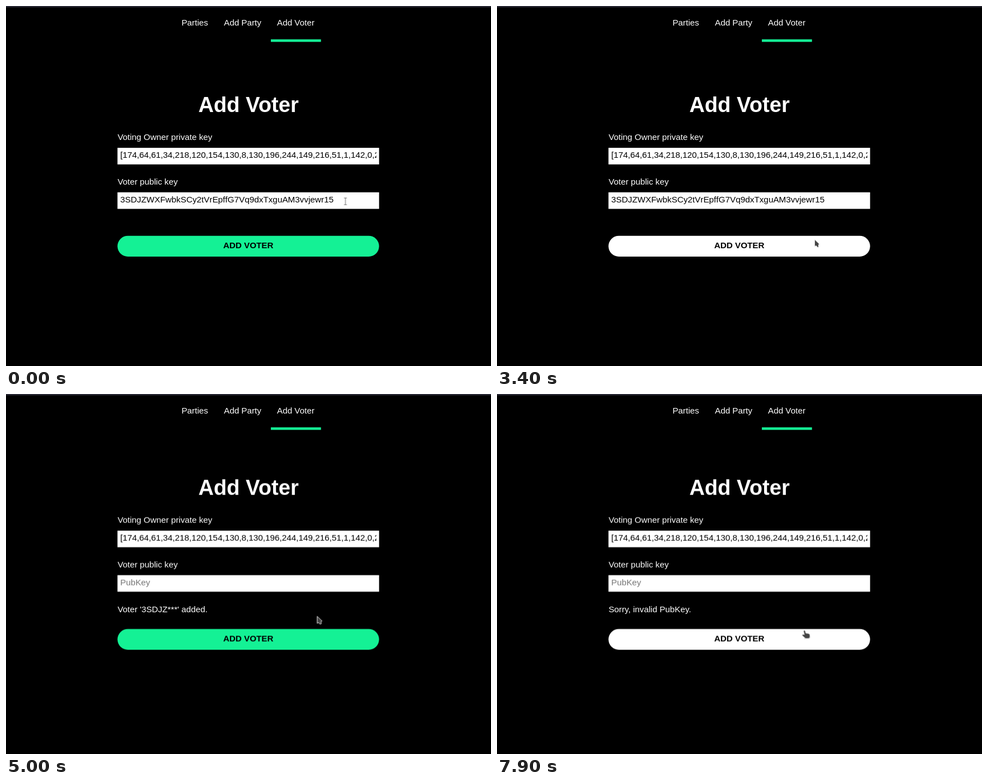
An HTML page for the animation above (8 s loop, 868 by 645 pixels).

```html
<!DOCTYPE html>
<html lang="en">
<head>
<meta charset="utf-8">
<title>Add Voter</title>
<style>
  html, body { margin: 0; width: 100%; height: 100%; overflow: hidden; background: #000; }
  svg { display: block; width: 868px; height: 645px; }
  text { font: 15.25px "Liberation Sans", Arial, sans-serif; fill: #fff; white-space: pre; }
  .title { font-size: 38.2px; font-weight: bold; text-anchor: middle; }
  .value { font-size: 15.3px; font-kerning: none; fill: #000; }
  .hint { fill: #757575; }
  .action { font-weight: bold; text-anchor: middle; fill: #000; }
  .field { fill: #fff; }
  .accent { fill: #14f195; }

  /* One shared 8 s clock; everything switches hard unless a keyframe says otherwise. */
  .form, .submit, .pill, .caret, .key, .hint, .busy, .done, .error, .cursor, .beam, .arrow, .hand {
    animation: 8s step-end infinite;
  }
  .form   { animation-name: form; }
  .submit { animation-name: submit; }
  .pill   { animation-name: pill; }
  .caret  { animation-name: caret; }
  .key    { animation-name: key; }
  .hint   { animation-name: hint; }
  .busy   { animation-name: busy; }
  .done   { animation-name: done; }
  .error  { animation-name: error; }
  .cursor { animation-name: cursor; }
  .beam   { animation-name: beam; }
  .arrow  { animation-name: arrow; }
  .hand   { animation-name: hand; }

  /* The status line makes the centred form taller. */
  @keyframes form   { 0% { transform: none; } 43.75%, 100% { transform: translateY(-9.3px); } }
  @keyframes submit { 0% { transform: none; } 43.75%, 100% { transform: translateY(9.3px); } }
  @keyframes pill {
    0%, 43.75% { fill: #14f195; }
    38.75%, 77.5%, 100% { fill: #fff; }
  }

  @keyframes caret {
    0%, 17.5%, 40%, 100% { opacity: 0; }
    3.75%, 32.5% { opacity: 1; }
  }
  @keyframes key   { 0% { opacity: 1; } 50%, 100% { opacity: 0; } }
  @keyframes hint  { 0% { opacity: 0; } 50%, 100% { opacity: 1; } }
  @keyframes busy  { 0%, 50%, 100% { opacity: 0; } 43.75% { opacity: 1; } }
  @keyframes done  { 0%, 92.5%, 100% { opacity: 0; } 50% { opacity: 1; } }
  @keyframes error { 0% { opacity: 0; } 92.5%, 100% { opacity: 1; } }

  /* The pointer moves in 100 ms hops. */
  @keyframes cursor {
    0% { transform: translate(607.5px, 350px); }
    26.25% { transform: translate(606px, 351.5px); }
    27.5% { transform: translate(606px, 351.5px); animation-timing-function: steps(3, start); }
    31.25% { transform: translate(587px, 380px); }
    32.5% { transform: translate(587px, 380px); animation-timing-function: steps(7, start); }
    41.25% { transform: translate(568px, 417.5px); }
    58.75% { transform: translate(568px, 417.5px); animation-timing-function: steps(4, start); }
    63.75% { transform: translate(556.5px, 397.5px); }
    71.25% { transform: translate(556.5px, 397.5px); animation-timing-function: steps(8, start); }
    81.25% { transform: translate(554.5px, 434.5px); }
    97.5% { transform: translate(554.5px, 434.5px); animation-timing-function: steps(2, start); }
    100% { transform: translate(549.5px, 423.5px); }
  }
  @keyframes beam  { 0% { opacity: 1; } 28.75%, 100% { opacity: 0; } }
  @keyframes arrow {
    0%, 38.75%, 77.5%, 100% { opacity: 0; }
    28.75%, 42.5% { opacity: 1; }
  }
  @keyframes hand {
    0%, 42.5% { opacity: 0; }
    38.75%, 77.5%, 100% { opacity: 1; }
  }
</style>
</head>
<body>
<svg viewBox="0 0 868 645">
  <defs>
    <clipPath id="inset"><rect x="204" y="250" width="459" height="40"/></clipPath>
  </defs>
  <rect width="868" height="645"/>
  <rect width="868" height="2.4" fill="#282833"/>

  <text x="314.2" y="35">Parties</text>
  <text x="390" y="35">Add Party</text>
  <text x="485" y="35">Add Voter</text>
  <rect class="accent" x="474" y="59.7" width="89.7" height="4.6"/>

  <g class="form">
    <text class="title" x="434" y="190.3">Add Voter</text>
    <text x="199.7" y="240.3">Voting Owner private key</text>
    <rect class="field" x="199.5" y="254.1" width="468.2" height="29.7"/>
    <text class="value" x="204.5" y="272.3" clip-path="url(#inset)">[174,64,61,34,218,120,154,130,8,130,196,244,149,216,51,1,142,0,2</text>

    <text x="199.7" y="320.3">Voter public key</text>
    <rect class="field" x="199.5" y="333.8" width="468.2" height="29.7"/>
    <text class="value key" x="204.5" y="352.3">3SDJZWXFwbkSCy2tVrEpffG7Vq9dxTxguAM3vvjewr15</text>
    <text class="hint" x="204.5" y="352.3">PubKey</text>
    <rect class="caret" x="586" y="340" width="1" height="17"/>
  </g>

  <text class="busy" x="199.7" y="391">Adding the voter...</text>
  <text class="done" x="199.7" y="391">Voter '3SDJZ***' added.</text>
  <text class="error" x="199.7" y="391">Sorry, invalid PubKey.</text>

  <g class="submit">
    <rect class="accent pill" x="199.5" y="411.7" width="468.2" height="37.3" rx="18.65"/>
    <text class="action" x="433.6" y="433.7">ADD VOTER</text>
  </g>

  <g class="cursor">
    <path class="beam" d="M-2.5 -6H2.5M0 -6V6M-2.5 6H2.5" fill="none" stroke="#666"/>
    <g class="arrow" stroke-linejoin="round">
      <path d="M1 2V14L3.5 12.5L6 16L8.5 14.5L7.5 11.5L10 10Z" fill="#000" opacity=".15"/>
      <path d="M.4 .8V13.3L3.2 12L5.6 15L8 13.8L7 10.6L9.2 9.2Z" fill="#444" stroke="#fff" stroke-width=".9"/>
    </g>
    <g class="hand">
      <path id="palm" d="M-.6 1Q.2 -.4 1.6 .6L3 5.2L8 6Q10.2 6.6 10.2 8.6V11Q10 14 7.6 14H3.4Q2 14 1 12.8L-2.8 9.2Q-3.4 7.8 -2 7.4L1 8Z" fill="#444"/>
      <path d="M0 14.8H8Q10.6 14.8 10.8 11" fill="none" stroke="#000" stroke-width="1.4" opacity=".14"/>
    </g>
  </g>
</svg>
</body>
</html>
```
